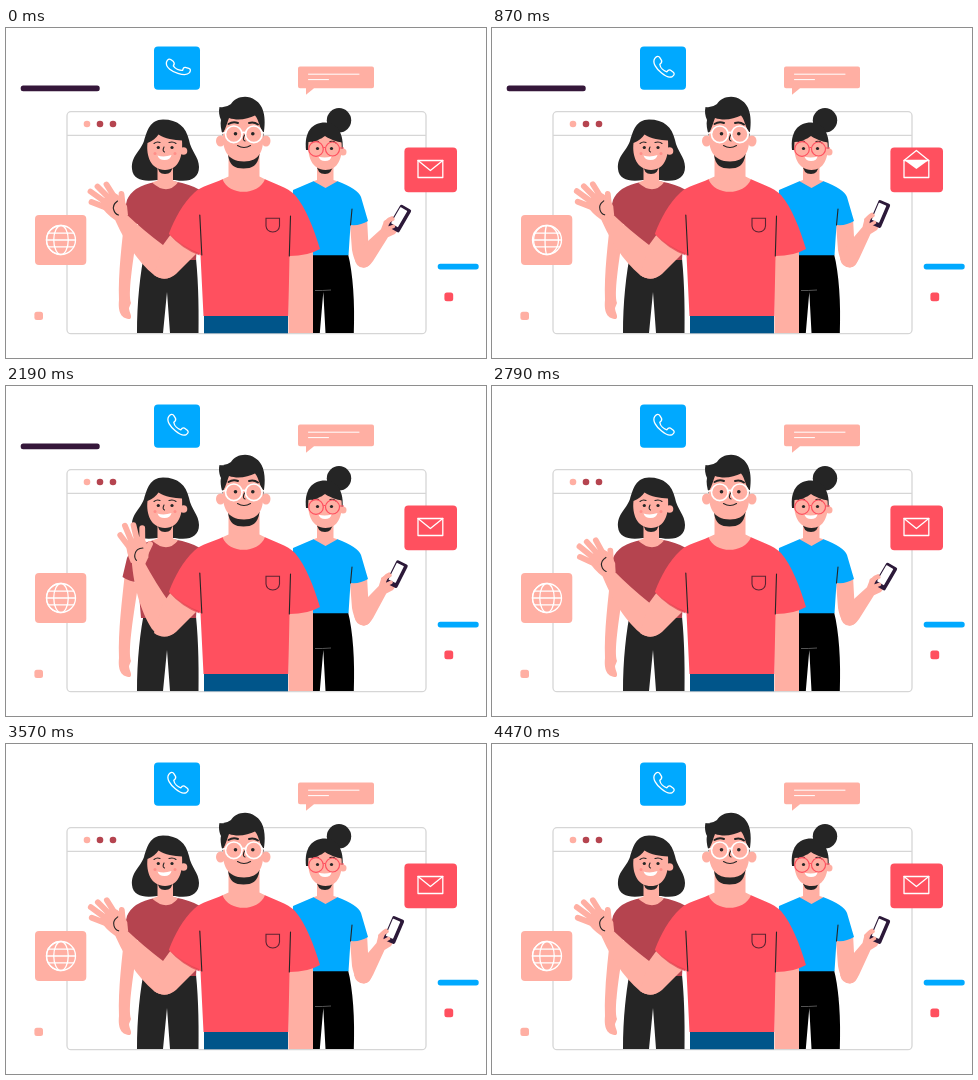
Animation of 480 by 330 pixels, one loop 4.5 s. Source, as an HTML page:

```html
<!DOCTYPE html>
<html lang="en">
<head>
<meta charset="utf-8">
<title>Team greeting</title>
<style>
html, body { margin: 0; width: 100%; height: 100%; overflow: hidden; background: #fff }
svg { display: block; width: 480px; height: 330px }
.skin { fill: #ffafa3 }
.dark { fill: #252525 }
.red { fill: #ff505f }
.blue { fill: #00a9ff }
.wine { fill: #b5444f }
.line { fill: none; stroke: #252525; stroke-width: 1.1; stroke-linecap: round }
.icon { fill: none; stroke: #fff; stroke-width: 1.3; stroke-linejoin: round; stroke-linecap: round }
.finger { fill: none; stroke: #ffafa3; stroke-width: 5.8; stroke-linecap: round }
</style>
</head>
<body>
<svg viewBox="0 0 480 330">
  <!-- browser window -->
  <g fill="none" stroke="#d6d6d6" stroke-width="1.3">
    <rect x="61" y="83.7" width="359" height="222" rx="4"/>
    <path d="M61 107.3H420"/>
  </g>
  <circle class="skin" cx="81" cy="96" r="3.3"/>
  <circle class="wine" cx="94" cy="96" r="3.3"/>
  <circle class="wine" cx="107" cy="96" r="3.3"/>

  <!-- decorations -->
  <rect id="bar" x="14.7" y="57.4" width="79" height="5.8" rx="2.5" fill="#35173a"/>
  <rect class="blue" x="431.7" y="235.8" width="41" height="5.6" rx="2.6"/>
  <rect class="red" x="438.4" y="264.6" width="8.8" height="8.6" rx="2.5"/>
  <rect class="skin" x="28.4" y="283.7" width="8.6" height="8.4" rx="2.5"/>
  <path class="skin" d="M294 38.5H366Q368 38.5 368 40.5V58.3Q368 60.3 366 60.3H308L300 66.8V60.3H294Q292 60.3 292 58.3V40.5Q292 38.5 294 38.5Z"/>
  <path class="icon" d="M302.500 46.200H353M302.500 51.600H322.500" style="stroke-width:1"/>

  <rect class="blue" x="148" y="18.500" width="46" height="43.300" rx="4"/>
  <path id="handset" class="icon" d="M-9-8C-7-10.500-5-10.500-3.800-8.500L-2.300-6C-1.500-4-2.500-3-4-2C-3.500 1.500 0 4.500 3 5.500C4 4 5 3 6.500 3.800L9.500 6C11 7.200 10.500 8.800 8.500 10.300C5.500 11.800 1 9.500-2.500 6.500C-7 3-12-3.500-9-8Z"/>

  <rect class="skin" x="29" y="187" width="51.300" height="50" rx="4"/>
  <g class="icon" transform="translate(55 212)">
    <circle r="14.500"/>
    <path d="M-14.500 0H14.500M-12.800-6.800H12.800M-12.800 6.800H12.800"/>
    <path id="meridians"/>
  </g>

  <rect class="red" x="398.400" y="119.600" width="52.600" height="44.600" rx="4"/>
  <path class="icon" d="M412 132.500V149.500H436.800V132.500Z"/>
  <path id="letter" fill="#fff" d="M412.700 132.500H436.100L424.400 141Z"/>
  <path id="flap" class="icon"/>

  <!-- woman with bob haircut -->
  <path class="skin" d="M119 186C116 215 112 245 113 272C112 282 114 291 124 291C127 289 123 284 123 280L125 275C122 266 126 238 132 200Z"/>
  <path class="dark" d="M139 222C134 245 131 275 131 305H157L161 264 164 305H192.500C193 275 192 245 189 222Z"/>
  <path class="dark" d="M157 91.500C144 91.500 141 103 138 113C134 124 125 128 126 141C127 152 138 154 151 152H169C184 155 193 150 193 139C193 129 185 123 183 112C180 99 172 91.500 157 91.500Z"/>
  <path class="wine" d="M149 154Q127 158 121 172L116.500 191Q124 196 132 196L135 232H190L194 162Q184 156 169 153.500Z"/>
  <path class="skin" d="M151.500 137H167V152.500L172 154.500Q161 168 146 154.500L151.500 152.500Z"/>
  <path class="dark" d="M151 136Q151.500 146 159 146Q166.500 146 167.500 136Z"/>
  <circle class="skin" cx="177.500" cy="123" r="3.800"/>
  <path class="skin" d="M141.500 115C147 113 150 110 152.500 106.500C159 111 168 112 176 112.500C177 128 173 142 159 142C145 142 140 128 141.500 115Z"/>
  <path class="line" d="M148 115.500Q151 113 154 114.500M163 114.500Q167 113 170 115.500M158 119Q156 123 158.500 124"/>
  <g id="eyesOpen" class="dark"><circle cx="152.300" cy="119.500" r="1.600"/><circle cx="166" cy="119.500" r="1.600"/></g>
  <path id="eyesShut" class="line" d="M149.500 120.500Q152.300 117.500 155 120.500M163.300 120.500Q166 117.500 168.800 120.500"/>
  <g fill="#ff8f89"><circle cx="149" cy="125.500" r="1.500"/><circle cx="169" cy="125.500" r="1.500"/></g>
  <path fill="#fff" d="M151.500 127.500Q158 129.500 165.500 127Q164.500 132 158.500 132Q153 132 151.500 127.500Z"/>

  <!-- woman with phone -->
  <path fill="#000" d="M306.500 226V305H313.800L317.300 264 319.500 305H347.800C349 275 347 245 342 226Z"/>
  <path fill="none" stroke="#777" stroke-width=".7" d="M309 262.500H316.500L325 262"/>
  <path class="skin" d="M343.500 190L361 190 362.500 218 366 230Q365 239 358 239.500Q349 239 346 222Z"/>
  <g id="phoneArm">
    <path class="skin" d="M348 231Q350 239.500 358 239.500Q363 239 367 231L378.500 206 385 202 389 195 386 187 380 184.500Q376 186 372.500 191L370.500 199 356 216Z"/>
    <g transform="translate(387.800 186) rotate(23)">
      <rect x="-6.300" y="-13" width="12.600" height="26" rx="1.800" fill="#2c1939"/>
      <rect x="-5.200" y="-10.300" width="8" height="18.800" rx=".6" fill="#fff"/>
    </g>
    <path class="finger" style="stroke-width:3.600" d="M374 191.500L381 187.500M376 198L382.500 194.500"/>
  </g>
  <circle class="dark" cx="333" cy="92.300" r="12.200"/>
  <path class="dark" d="M300 122C298 104 306 94.500 319 94.500C332 95 338 106 336.500 123Z"/>
  <path class="blue" d="M308 153L287 162 284 227.200H342.500L344.500 197Q354 198 362 193L355 169Q352 161 331 153Z"/>
  <path class="skin" d="M311 138H327.500V152L331.500 153.200 319.500 160 307.500 153.200 311 152Z"/>
  <path class="line" d="M344.500 197L346 181"/>
  <path class="dark" d="M310.500 136Q311 146 319 146Q326 146 327.500 136Z"/>
  <circle class="skin" cx="337" cy="124" r="3.500"/>
  <path class="skin" d="M302.500 114C310 113.500 315 111 319 108C325 112 331 113.500 335.500 114.500C337 130 332 142 319.500 142C306 142 301 128 302.500 114Z"/>
  <path class="line" d="M306 113.800Q309 112 312.500 113.500M324 113.500Q328 112.500 330 115"/>
  <g fill="none" stroke="#ff505f" stroke-width="1.200">
    <circle cx="310" cy="121" r="7.300"/><circle cx="326.500" cy="121" r="7"/>
    <path d="M333 120L338 120M317.300 119.500H319.500"/>
  </g>
  <g class="dark"><circle cx="311.500" cy="120.500" r="1.600"/><circle cx="325.500" cy="120.500" r="1.600"/></g>
  <path fill="#fff" d="M312.500 128.800Q319 130.500 325.500 128.500Q324.500 133 319 133Q314 133 312.500 128.800Z"/>

  <!-- man -->
  <path class="skin" d="M281.800 222L307 220V305H282.500Z"/>
  <rect x="198" y="287" width="84" height="18.300" fill="#00558a"/>
  <g id="forearm">
    <path class="skin" d="M105 182C116 211 132 234 148 247Q160 255 170 245L174 226L157 217Q138 203 119 185Z"/>
    <g id="hand">
      <path class="skin" d="M96 172L106 164Q116 167 121 178L122 187 109 192Q99 185 96 179Z"/>
      <path class="finger" d="M101 180L85.500 174M102 176L84.500 163.500M105 172L91.500 158.500M109 170L100.500 156.500M117 180L115.500 166"/>
      <path class="line" d="M111.500 173Q106 177 107.800 182Q109 186 112.500 187"/>
    </g>
  </g>
  <path class="skin" d="M165 206L196 200 194 222 170 246Q159 255 148 247L157 217Z"/>
  <path class="red" d="M217 151C207 156 195 158 188 165C177 175 169 190 162.800 206Q176 219 194.500 227L197.500 288H282.300L283.500 228Q302 228 314 221C308 201 300 180 289 167C281 159 269 156 258.500 151Z"/>
  <path fill="#e0414f" opacity=".75" d="M163 206Q177 219 193 225L193.500 227.500Q176 221 162.800 206Z"/>
  <path class="skin" d="M222.500 125H253.500V148.500L259 151.200C252 168 223 168 216.500 151.200L222.500 148.500Z"/>
  <path class="dark" d="M222 126C223 138 229 140.500 237.500 140.500C246 140.500 252 138 253.500 126Z"/>
  <path class="line" d="M193.800 187L195.800 227M284.500 188L283.300 228"/>
  <path class="line" style="stroke:#5c2432" d="M260 190.300H273.500V198Q273 203.500 266.800 204Q260.500 203.500 260 198Z"/>
  <ellipse class="skin" cx="214.500" cy="113" rx="4.500" ry="5.600"/>
  <ellipse class="skin" cx="260" cy="113" rx="4.500" ry="5.600"/>
  <path class="dark" d="M217 108C215 102 214 96 215 92C213 88 212.500 83 213.500 79Q220 80 225 76C229 69 241 66 249 72C259 78 260.500 92 257 110Z"/>
  <path class="skin" d="M217 105C220 100 221 95 223 90C232 93 242 91 249 87.500C253 92 253 99 257 104C258.500 122 254 133.500 238 133.500C221 133.500 216 121 217 105Z"/>
  <path class="line" style="stroke-width:2" d="M222.500 96Q227 93 232 95M243 95Q248 93.500 252 96.500"/>
  <g class="icon" style="stroke-width:1.600">
    <circle cx="227.800" cy="106.300" r="8.300"/><circle cx="247.800" cy="106.300" r="8.300"/>
    <path d="M236 105Q238 103.500 239.700 105M219.500 104.500L215 105.500M256 104.500L260 105.500"/>
  </g>
  <g class="dark"><circle cx="229.500" cy="105.800" r="1.800"/><circle cx="246.800" cy="105.800" r="1.800"/></g>
  <path class="line" d="M238.500 107Q236 112 239 113M231.500 117.500Q238 121.500 244.500 117.500"/>
</svg>
<script>
const LOOP = 4500, WAVE = 900, SWING = 2600;
const $ = id => document.getElementById(id);
const set = (id, name, value) => $(id).setAttribute(name, value);
const show = (id, on) => set(id, 'visibility', on ? 'visible' : 'hidden');
const ease = (t, from, to) => {
  const p = Math.min(1, Math.max(0, (t - from) / (to - from)));
  return p * p * (3 - 2 * p);
};

function meridians(turn) {
  const r = 14.5;
  return [-90, -30, 30].map(start => {
    const x = r * Math.sin((start + turn % 60) * Math.PI / 180);
    return `M0 ${-r}A${Math.abs(x)} ${r} 0 0 ${x > 0 ? 1 : 0} 0 ${r}`;
  }).join('');
}

function draw(t) {
  const wave = (1 - Math.cos(2 * Math.PI * t / WAVE)) / 2;
  set('forearm', 'transform', `rotate(${19 * wave} 160 238)`);
  set('hand', 'transform', `rotate(${14 * wave} 113 185)`);

  const s = t % SWING;
  const tilt = 1 - ease(s, 310, 700) + ease(s, 1950, 2430);
  set('phoneArm', 'transform', `rotate(${7.3 * tilt} 355 235)`);

  const ring = -22 * Math.cos(2 * Math.PI * t / 300) * Math.max(0, 1 - t / 700);
  set('handset', 'transform', `translate(171.8 38.3) rotate(${ring})`);

  const open = ease(t, 400, 700) - ease(t, 1750, 2050);
  set('flap', 'd', `M412 132.5L424.4 ${142.5 - 20 * open}L436.8 132.5`);
  set('letter', 'opacity', open);

  set('meridians', 'd', meridians(180 * ease(t, 400, 1400)));
  const blink = t >= 1560 && t < 1710;
  show('eyesOpen', !blink);
  show('eyesShut', blink);
  show('bar', t < 2760);
}

function tick() {
  draw(performance.now() % LOOP);
  requestAnimationFrame(tick);
}
tick();
</script>
</body>
</html>
```
